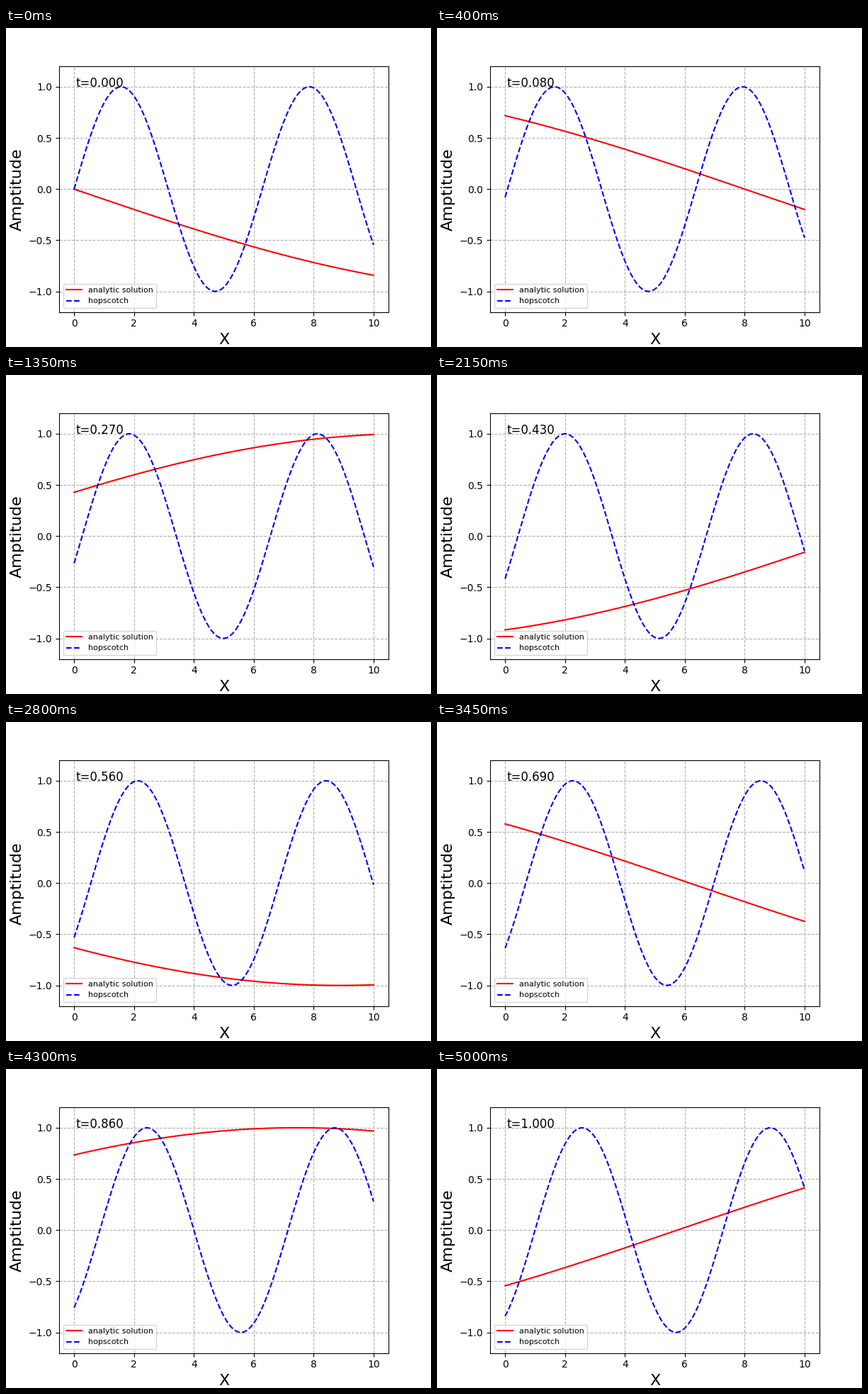
A matplotlib script for the animation above (5050 ms loop, 600 by 450 pixels).

```python
import numpy as np
import matplotlib.pyplot as plt
from matplotlib.animation import FuncAnimation

FRAMES = 101
INTERVAL = 50  # ms
DT = 0.01

x = np.linspace(0, 10, 101)


def slow_wave(t):
    return np.sin(10 * t - 0.1 * x)


def fast_wave(t):
    return np.sin(x - t)


plt.rcParams["font.family"] = "DejaVu Sans"
fig, ax = plt.subplots(figsize=(6, 4.5), dpi=100)
fig.subplots_adjust(left=0.125, right=0.9, bottom=0.11, top=0.88)

slow, = ax.plot(x, slow_wave(0), "r-", lw=1.5, label="analytic solution")
fast, = ax.plot(x, fast_wave(0), "b--", lw=1.5, label="hopscotch")
clock = ax.text(0.05, 1.0, "t=0.000", fontsize=12)

ax.set_xlim(-0.5, 10.5)
ax.set_ylim(-1.2, 1.2)
ax.set_xticks(range(0, 11, 2))
ax.set_yticks(np.arange(-1, 1.1, 0.5))
ax.set_xlabel("X", fontsize=16)
ax.set_ylabel("Amptitude", fontsize=16)
ax.grid(linestyle="--")
ax.legend(loc="lower left", fontsize=8)


def update(i):
    t = i * DT
    slow.set_ydata(slow_wave(t))
    fast.set_ydata(fast_wave(t))
    clock.set_text(f"t={t:.3f}")
    return slow, fast, clock


anim = FuncAnimation(fig, update, frames=FRAMES, interval=INTERVAL,
                     repeat=True, repeat_delay=0, blit=False)
plt.show()
```
